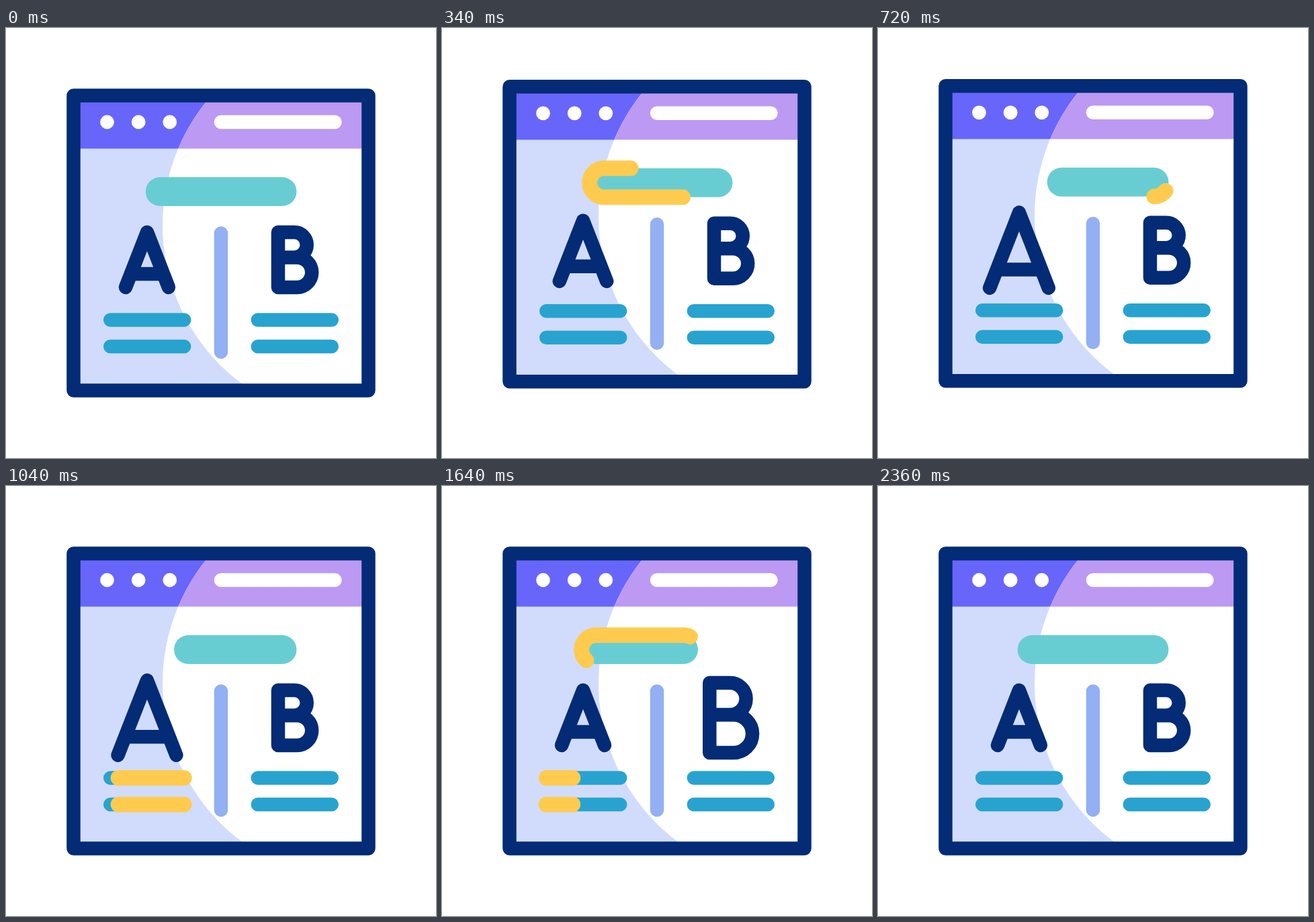
An HTML page that plays this animation: 640x640 px, repeating every 2.4 s.

```html
<!DOCTYPE html>
<html lang="en">
<head>
<meta charset="utf-8">
<title>A/B test</title>
<style>
  html, body { margin: 0; width: 100%; height: 100%; overflow: hidden; background: #fff; }
  svg { display: block; width: 100%; height: 100%; }
  .stroke { fill: none; stroke-linecap: round; stroke-linejoin: round; }
  .ink { stroke: #032b76; stroke-width: 20.5; }
  .text { stroke: #28a3cf; stroke-width: 20.5; }
  .glow { stroke: #ffcb4f; stroke-width: 23; }
</style>
</head>
<body>
<svg viewBox="0 0 640 640">
  <defs>
    <clipPath id="pane"><rect x="100" y="100" width="440" height="440"/></clipPath>
  </defs>
  <g id="win">
    <g clip-path="url(#pane)">
      <rect x="100" y="100" width="440" height="440" fill="#d1dcfd"/>
      <rect x="100" y="100" width="440" height="79.5" fill="#6865fa"/>
      <clipPath id="disc"><circle cx="527" cy="294" r="294"/></clipPath>
      <g clip-path="url(#disc)">
        <rect x="100" y="100" width="440" height="440" fill="#fff"/>
        <rect x="100" y="100" width="440" height="79.5" fill="#bc99f2"/>
      </g>
    </g>
    <rect class="stroke ink" x="100.5" y="100.5" width="439" height="439"/>
    <g fill="#fff">
      <circle cx="150.5" cy="140" r="10.4"/>
      <circle cx="197.2" cy="140" r="10.4"/>
      <circle cx="243.8" cy="140" r="10.4"/>
    </g>
    <path class="stroke" d="M320 140H489.5" stroke="#fff" stroke-width="20.5"/>
    <path class="stroke" d="M320 305.5V482" stroke="#92b0f3" stroke-width="20.5"/>
    <path id="bar" fill="#68cdd2"/>
    <path id="loop" class="stroke glow" pathLength="1"/>
    <path id="a" class="stroke ink"/>
    <path id="b" class="stroke ink"/>
    <path class="stroke text" d="M155.2 434.5h110M155.2 474h110M374.8 434.5h110M374.8 474h110"/>
    <path id="left" class="stroke glow"/>
    <path id="right" class="stroke glow"/>
  </g>
</svg>
<script>
const LOOP = 2400;
const el = id => document.getElementById(id);
const [win, bar, loop, a, b, left, right] =
  ['win', 'bar', 'loop', 'a', 'b', 'left', 'right'].map(el);

const ramp = (t, from, to) => {
  const u = Math.min(1, Math.max(0, (t - from) / (to - from)));
  return u * u * (3 - 2 * u);
};
const pulse = (t, up0, up1, down0, down1) => ramp(t, up0, up1) - ramp(t, down0, down1);

// Two hops in a row
const HOP = 22, HALF = 191.5;
const lift = t => [0, 2].reduce((sum, n) => {
  const s = HOP + n * HALF;
  return sum + pulse(t, s, s + HALF, s + HALF, s + 2 * HALF);
}, 0) * 50.5;

// Clockwise pill, starting at its lower right corner
const pill = (x0, x1) => {
  const r = 21.5, y = 243.5;
  return `M${x1 - r} ${y + r}H${x0 + r}A${r} ${r} 0 0 1 ${x0 + r} ${y - r}` +
         `H${x1 - r}A${r} ${r} 0 0 1 ${x1 - r} ${y + r}Z`;
};

const letterA = s => {
  const x = 210, y = 345, w = 32 * s, h = 41 * s;
  return `M${x - w} ${y + h}L${x} ${y - h}L${x + w} ${y + h}` +
         `M${x - w * .75} ${y + h * .51}H${x + w * .75}`;
};

const letterB = s => {
  const x = 430 - 25 * s, y = 345 - 41 * s, r = 18.75 * s, q = 22.25 * s;
  const mid = y + 2 * r;
  return `M${x} ${mid}V${y}H${x + 24 * s}a${r} ${r} 0 0 1 0 ${2 * r}H${x}` +
         `V${mid + 2 * q}H${x + 28 * s}a${q} ${q} 0 0 0 0 ${-2 * q}H${x}`;
};

const trim = (path, head, tail) => {
  const len = head - tail;
  path.style.display = len > 0.0005 ? '' : 'none';
  path.setAttribute('stroke-dasharray', `${len} 2`);
  path.setAttribute('stroke-dashoffset', -tail);
};

// Highlight runs along both text lines, then drains to the right
const sweep = (path, x, t, starts) => {
  const s = starts.find(v => t > v && t < v + 400);
  path.style.display = s === undefined ? 'none' : '';
  if (s === undefined) return;
  const x0 = x + 110 * ramp(t, s + 200, s + 400);
  const x1 = x + 110 * ramp(t, s, s + 200) + 0.01;
  path.setAttribute('d', `M${x0} 434.5H${x1}M${x0} 474H${x1}`);
};

function draw(t) {
  const growA = pulse(t, 240, 535, 1020, 1200);
  const growB = pulse(t, 1200, 1590, 2180, 2360);
  win.setAttribute('transform', `translate(0 ${-lift(t)})`);
  a.setAttribute('d', letterA(1 + .37 * growA));
  b.setAttribute('d', letterB(1 + .27 * growB));

  const shape = pill(207.7 + 44 * growA, 432.5 - 51.5 * growB);
  bar.setAttribute('d', shape);
  loop.setAttribute('d', shape);
  const k = t < 1182 ? t : t - 1182;
  trim(loop, ramp(k, 20, 597), ramp(k, 222, 797));

  sweep(left, 155.2, t, [800, 1560]);
  sweep(right, 374.8, t, [1960]);
}

const start = performance.now();
function tick() {
  draw((performance.now() - start) % LOOP);
  requestAnimationFrame(tick);
}
draw(0);
requestAnimationFrame(tick);
</script>
</body>
</html>
```
